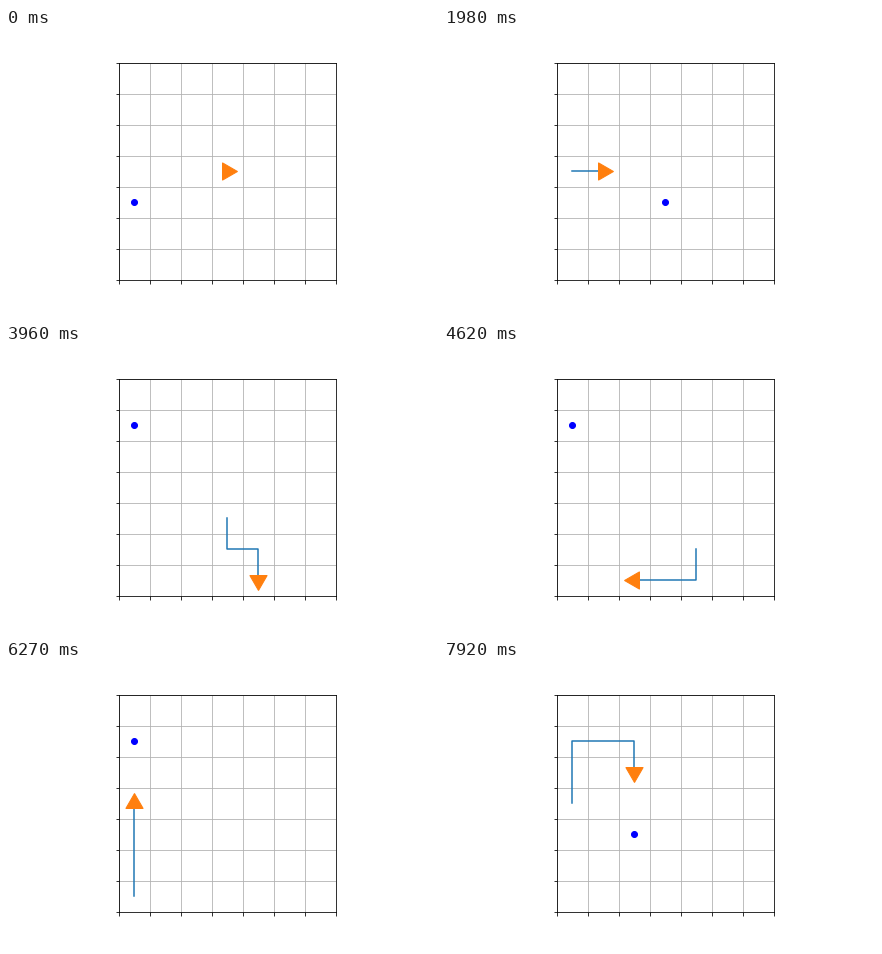
Write a matplotlib script that moves like this. It is 432 px wide and 288 px high and loops after 8 s.

```python
import matplotlib.pyplot as plt
from matplotlib.animation import FuncAnimation

SIZE = 7
STEP, LOOP, TICK = 330, 8000, 20  # ms

DIRS = {"U": (0, -1, 0), "L": (-1, 0, 90), "D": (0, 1, 180), "R": (1, 0, 270)}
START = (3, 3)
MOVES = "RDLLLURDRRDRDLLLLUUUUURRD"  # heading at each step
FOODS = [(0, 4), (3, 4), (4, 6), (0, 1), (2, 1), (2, 4)]


def play():
    """Return (body, heading angle, food) for every step of the game."""
    body, eaten, states = [START], 0, []
    for i, move in enumerate(MOVES):
        dx, dy, angle = DIRS[move]
        if i:
            x, y = body[-1]
            body = body + [(x + dx, y + dy)]
            if body[-1] == FOODS[eaten]:
                eaten += 1
            else:
                body = body[1:]
        states.append((body, angle, FOODS[eaten]))
    return states


def centers(cells):
    return [x + 0.5 for x, _ in cells], [y + 0.5 for _, y in cells]


states = play()

fig, ax = plt.subplots(figsize=(6, 4), dpi=72)
fig.subplots_adjust(left=0.125, right=0.9, bottom=0.125, top=0.88)
ax.set_aspect("equal")
ax.set(xlim=(0, SIZE), ylim=(SIZE, 0),
       xticks=range(SIZE + 1), yticks=range(SIZE + 1))
ax.tick_params(labelbottom=False, labelleft=False)
ax.grid(True)

trail, = ax.plot([], [], color="C0")
head, = ax.plot([], [], color="C1", marker=(3, 0, 0), markersize=20)
dot, = ax.plot([], [], "bo")


def update(frame):
    # a move that falls inside this tick is shown from its start
    step = (frame * TICK + TICK // 2) // STEP
    body, angle, food = states[min(step, len(states) - 1)]
    trail.set_data(*centers(body))
    trail.set_visible(len(body) > 1)
    head.set_data(*centers(body[-1:]))
    head.set_marker((3, 0, angle))
    dot.set_data(*centers([food]))
    return trail, head, dot


anim = FuncAnimation(fig, update, frames=LOOP // TICK, interval=TICK,
                     repeat=True, repeat_delay=0)
plt.show()
```
